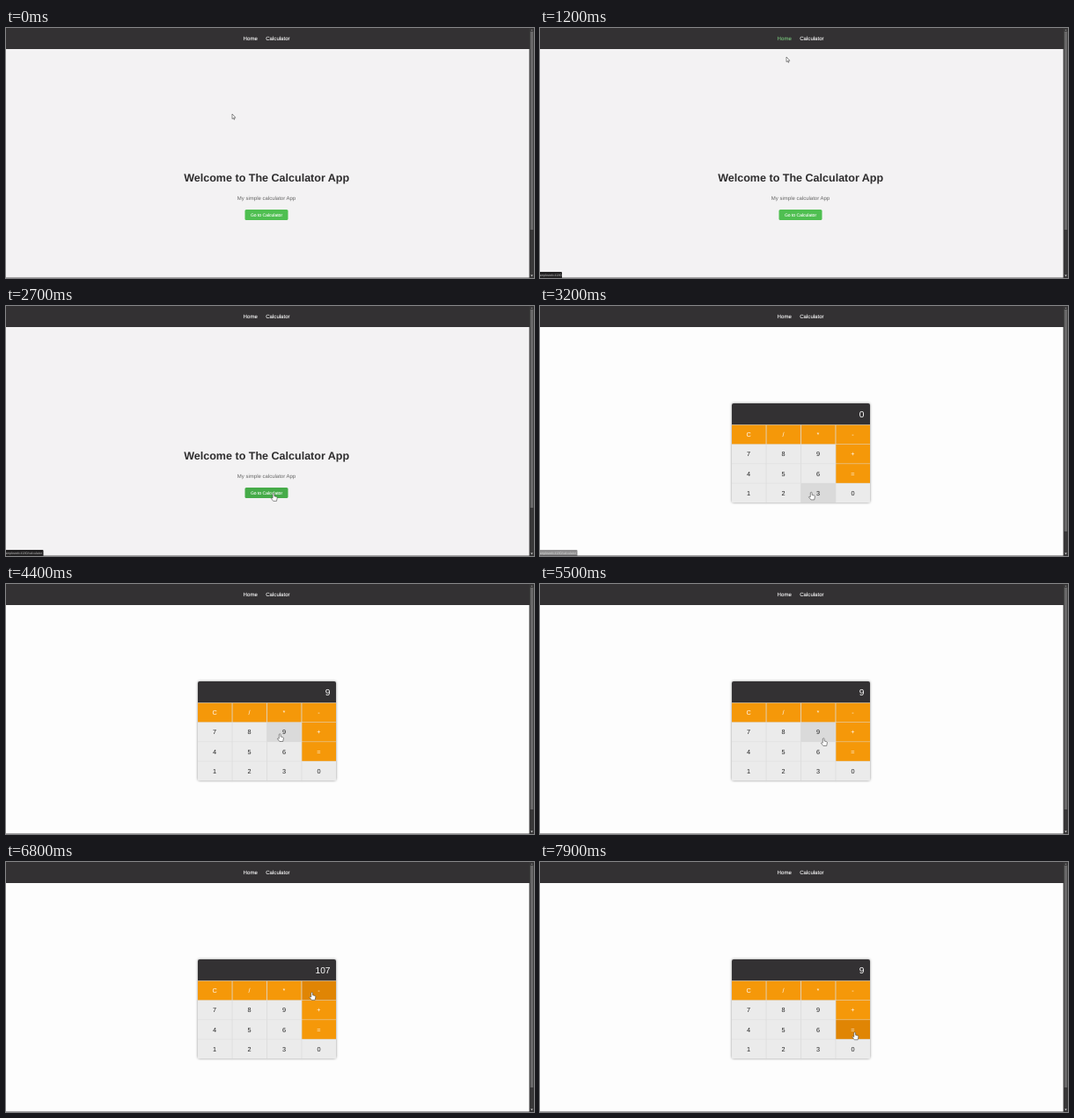
Recreate the animation shown at these times as an HTML page. Size 600 by 285 pixels, loop 8000 ms.

```html
<!DOCTYPE html>
<html lang="en">
<head>
<meta charset="utf-8">
<title>Calculator app</title>
<style>
  html, body { margin: 0; width: 100%; height: 100%; overflow: hidden; background: #f3f2f3; }
  svg { display: block; width: 600px; height: 285px; }
  text { font-family: "Liberation Sans", Arial, sans-serif; text-rendering: geometricPrecision; }
</style>
</head>
<body>
<svg viewBox="0 0 600 285">
  <rect id="page" width="600" height="285"/>
  <rect width="595" height="24" fill="#333133"/>
  <g font-size="6.1" fill="#fff" stroke="#fff" stroke-width=".08">
    <text id="homeLink" x="269.6" y="13.6">Home</text>
    <text x="295.2" y="13.6">Calculator</text>
  </g>

  <g id="welcome" text-anchor="middle">
    <text x="296.2" y="175.3" font-size="12.54" font-weight="bold" fill="#2e2d2e">Welcome to The Calculator App</text>
    <text x="296" y="195.9" font-size="6" fill="#666">My simple calculator App</text>
    <rect id="goButton" x="271.5" y="207" width="49" height="12" rx="1.6"/>
    <text x="296" y="214.7" font-size="5" fill="#fff" stroke="#fff" stroke-width=".08">Go to Calculator</text>
  </g>

  <g id="calculator">
    <rect x="218" y="111" width="157" height="113" rx="2" fill="#dcdcdc"
      style="filter: drop-shadow(0 0 1.6px rgba(0,0,0,.45))"/>
    <path d="M218 135.3V113Q218 111 220 111H373Q375 111 375 113V135.3Z" fill="#333133"/>
    <text id="display" x="368.5" y="126.6" font-size="10.2" fill="#fff" text-anchor="end"></text>
    <g id="keys" font-size="7.3" text-anchor="middle"></g>
  </g>

  <rect y="284" width="595" height="1" fill="#a5a4a5"/>
  <rect x="594.6" width="5.4" height="285" fill="#383738"/>
  <rect id="thumb" x="595.8" y="4" width="3.4" fill="#696869"/>
  <path d="M596.3 3L597.5 1.4 598.7 3Z" fill="#888"/>
  <path d="M596.2 281.4H598.8L597.5 283.2Z" fill="#ddd"/>

  <g id="status">
    <path id="statusBox" fill="#232223"/>
    <text id="statusText" x="-.8" y="282.8" font-size="3.6" fill="#bbb"></text>
  </g>

  <g id="cursor" stroke="#444" stroke-width=".6" stroke-linejoin="round" fill="#fff">
    <path id="arrow" d="M0 0V5.6L1.3 4.5 2.1 6.4 3 6 2.2 4.2H3.9Z"/>
    <path id="hand" d="M-.9 .6Q0 -.6 .9 .6V3.2L3.5 3.9Q4.3 4.2 4.2 5.2L3.5 8.7H-.3L-2.8 5.6Q-2.5 4.5 -.9 5.4Z"/>
  </g>
</svg>
<script>
const LOOP = 8000, STEP = 100, OPEN_CALCULATOR = 2900;
const HOST = "ampleweb:4180";
const $ = id => document.getElementById(id);
const clamp = v => Math.min(1, Math.max(0, v));
const show = (node, visible) => { node.style.display = visible ? "" : "none"; };
const inside = (p, r) => p.x >= r.x && p.x < r.x + r.w && p.y >= r.y && p.y < r.y + r.h;

// 1 between two times, then fading out
const presence = (t, from, to, fade) => t < from ? 0 : clamp(1 - (t - to) / fade);

function add(tag, attrs, label = "") {
  const node = document.createElementNS("http://www.w3.org/2000/svg", tag);
  for (const name in attrs) node.setAttribute(name, attrs[name]);
  node.textContent = label;
  return $("keys").appendChild(node);
}

const cell = { w: 39.45, h: 22.2 };
const keys = [..."C/*-789+456=1230"].map((label, i) => {
  const x = 218 + (i % 4) * cell.w, y = 135.7 + Math.floor(i / 4) * cell.h;
  const operator = !/\d/.test(label);
  const rect = add("rect", { x, y, width: cell.w - .8, height: cell.h - .5 });
  add("text", { x: x + 19.1, y: y + 13.5, fill: operator ? "#fff" : "#222" }, label);
  return { label, x, y, ...cell, rect, colors: operator ? ["#f59809", "#e08504"] : ["#ebebeb", "#dadada"] };
});

const homeArea = { x: 268, y: 7, w: 20, h: 10 };
const buttonArea = { x: 271.5, y: 207, w: 49, h: 12 };

// Stops of the pointer; on keys, dx and dy are measured from the key's centre
const at = (time, x, y) => ({ time, x, y });
const over = (time, label, dx = 0, dy = 0) => {
  const key = keys.find(k => k.label === label);
  return at(time, key.x + 19.3 + dx, key.y + 10.9 + dy);
};
const press = (time, label, dx, dy) => ({ ...over(time, label, dx, dy), label });

const route = [
  at(0, 257, 98), at(400, 212, 163), at(600, 299, 211), at(900, 279, 12), at(1100, 279, 14),
  at(1200, 280, 33), at(1800, 385, 57), at(2400, 304, 213), at(OPEN_CALCULATOR, 304, 214),
  over(3200, "3", -8, -1), over(3600, "+", -2, 4),
  over(4000, "9", -5, 2), press(4400, "9", -5, 2), press(4700, "8", 0, -2),
  over(5000, "+", -5), press(5200, "+", -5), press(5400, "9", 6, 7), over(5500, "9", 6, 7),
  at(5800, 346, 204), press(6000, "=", -3, 3), press(6800, "-", -8, 2),
  over(7200, "9", 0, 3), press(7400, "9", 0, 3), over(7900, "=", 2, 3)
];

function pointerAt(t) {
  const next = route.findIndex(stop => stop.time > t);
  if (next < 0) return route.at(-1);
  const a = route[next - 1], b = route[next];
  const k = (t - a.time) / (b.time - a.time), ease = k * k * (3 - 2 * k);
  return { x: a.x + (b.x - a.x) * ease, y: a.y + (b.y - a.y) * ease };
}

// Replays every press up to the given time
function displayAt(t) {
  let shown = "0", stored = 0, operator = "", fresh = true;
  for (const { label, time } of route) {
    if (!label || time > t) continue;
    if (/\d/.test(label)) {
      shown = fresh ? label : shown + label;
      fresh = false;
    } else {
      if (label === "=") shown = String(operator === "+" ? stored + +shown : stored - shown);
      stored = +shown;
      operator = label;
      fresh = true;
    }
  }
  return shown;
}

function renderStatus(t) {
  const forHome = t < 2000;
  const width = forHome ? 25 : 42.5;
  $("status").style.opacity = forHome ? presence(t, 1000, 1300, 200) : presence(t, 2500, 3100, 200);
  $("statusBox").setAttribute("d", `M0 278H${width - 1}q1 0 1 1V285H0Z`);
  $("statusText").textContent = forHome ? HOST : HOST + "/calculator";
}

function render(t) {
  const pointer = pointerAt(t);
  const opened = t >= OPEN_CALCULATOR;
  const overButton = !opened && inside(pointer, buttonArea);
  const hovered = opened && keys.find(key => inside(pointer, key));
  const hand = overButton || hovered || inside(pointer, homeArea);

  $("page").setAttribute("fill", opened ? "#fdfdfd" : "#f3f2f3");
  show($("welcome"), !opened);
  show($("calculator"), opened);
  $("thumb").setAttribute("height", opened ? 253 : 226);
  $("goButton").setAttribute("fill", overButton ? "#46ab49" : "#4fbf51");
  const green = 100 * presence(t, 900, 1100, 400);
  $("homeLink").style.fill = $("homeLink").style.stroke = `color-mix(in srgb, #4caf50 ${green}%, #fff)`;
  $("display").textContent = displayAt(t);
  for (const key of keys) key.rect.setAttribute("fill", key.colors[key === hovered ? 1 : 0]);
  renderStatus(t);

  show($("hand"), hand);
  show($("arrow"), !hand);
  $("cursor").setAttribute("transform", `translate(${pointer.x} ${pointer.y})`);
}

const start = performance.now();
function tick() {
  const t = (performance.now() - start) % LOOP;
  render(Math.floor(t / STEP) * STEP);
  requestAnimationFrame(tick);
}
tick();
</script>
</body>
</html>
```
